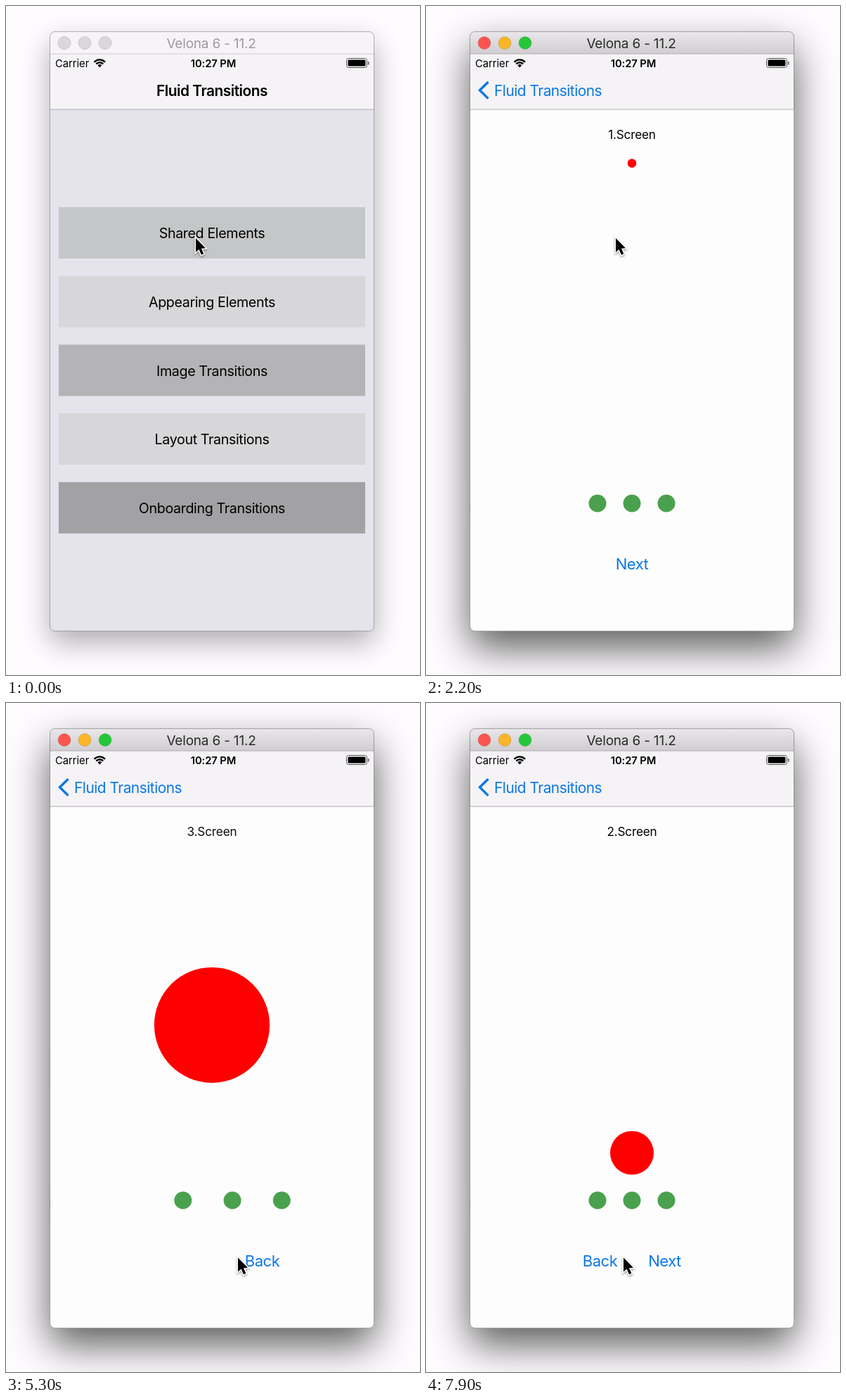
Animation, 589 px wide and 951 px high, one loop 8 s. Source, as an HTML page with a canvas:

```html
<!DOCTYPE html>
<html lang="en">
<head>
<meta charset="utf-8">
<title>Fluid Transitions</title>
<style>
html, body { margin: 0; width: 100%; height: 100%; overflow: hidden; background: #fefcfe; }
canvas { display: block; }
</style>
</head>
<body>
<canvas id="stage" width="589" height="951"></canvas>
<script>
const c = document.getElementById('stage').getContext('2d');
const LOOP = 8000, STEP = 100;
const LEFT = 62.5, TOP = 36.5, WIDTH = 461, BOTTOM = 888.5, MID = 293, NAV = 147;
const BLUE = '#0a78e6', PAPER = '#fefdfe', LAVENDER = '#e5e4ed';

const clamp = x => Math.max(0, Math.min(1, x));
const mix = (a, b, p) => a + (b - a) * p;
const smooth = x => { x = clamp(x); return x * x * (3 - 2 * x); };
const inOut4 = x => { x = clamp(x); return x < .5 ? 8 * x ** 4 : 1 - 8 * (1 - x) ** 4; };

function rect(x, y, w, h, fill) {
  c.fillStyle = fill;
  c.fillRect(x, y, w, h);
}

function disc(x, y, r, fill) {
  c.fillStyle = fill;
  c.beginPath();
  c.arc(x, y, r, 0, 7);
  c.fill();
}

// y is the middle of the capitals
function text(str, x, y, size, { color = '#000', weight = 400, spacing = 0, align = 'center' } = {}) {
  c.font = `${weight} ${size}px Inter, sans-serif`;
  c.letterSpacing = spacing + 'px';
  c.textAlign = align;
  c.fillStyle = color;
  c.fillText(str, x, y + size * .364);
}

function faded(alpha, draw) {
  c.save();
  c.globalAlpha *= clamp(alpha);
  draw();
  c.restore();
}

function frame() {
  c.beginPath();
  c.roundRect(LEFT, TOP, WIDTH, BOTTOM - TOP, 7);
}

function windowShadow(active) {
  c.save();
  c.shadowColor = active ? 'rgba(0,0,0,.64)' : 'rgba(0,0,0,.32)';
  c.shadowBlur = active ? 56 : 40;
  c.shadowOffsetY = active ? 24 : 16;
  c.fillStyle = '#f5f3f6';
  frame();
  c.fill();
  c.restore();
}

function titleBar(active) {
  const g = c.createLinearGradient(0, 37, 0, 68);
  g.addColorStop(0, active ? '#e9e7e9' : '#f6f4f6');
  g.addColorStop(1, active ? '#cfcdcf' : '#f6f4f6');
  rect(62, 36, 462, 32, g);
  rect(62, 67.5, 462, 1, active ? '#b1afb1' : '#cfcdcf');
  ['#fc5450', '#fdb528', '#25c738'].forEach((color, i) => {
    disc(83 + 29 * i, 52.5, 9, active ? color : '#d9d7d9');
    c.strokeStyle = active ? 'rgba(0,0,0,.14)' : '#c9c7c9';
    c.lineWidth = 1;
    c.stroke();
  });
  text('Velona 6 - 11.2', 292, 53, 19, { color: active ? '#2b2a2b' : '#9b999b', spacing: -.2 });
}

function statusBar() {
  text('Carrier', 70, 81.5, 14.75, { align: 'left' });
  text('10:27 PM', 295, 81.5, 14.75, { weight: 600, spacing: -.1 });
  c.strokeStyle = '#000';
  c.lineWidth = 2.4;
  for (const r of [6.8, 10.6]) {
    c.beginPath();
    c.arc(133.3, 87, r, -Math.PI * .76, -Math.PI * .24);
    c.stroke();
  }
  c.fillStyle = '#000';
  c.beginPath();
  c.moveTo(133.3, 87.5);
  c.arc(133.3, 87, 4, -Math.PI * .76, -Math.PI * .24);
  c.fill();
  c.lineWidth = 1;
  c.strokeStyle = '#555';
  c.beginPath();
  c.roundRect(484.5, 74.5, 29, 13, 3);
  c.stroke();
  c.fillStyle = '#000';
  c.beginPath();
  c.roundRect(486.5, 76.5, 25, 9, 1.5);
  c.fill();
  rect(515, 79, 1.5, 4.5, '#555');
}

function navBar(push) {
  faded(1 - push, () => text('Fluid Transitions', MID, 120.5, 20.9, { weight: 600, spacing: -.5 }));
  faded(push, () => {
    c.strokeStyle = BLUE;
    c.lineWidth = 3.4;
    c.beginPath();
    c.moveTo(88.5, 108);
    c.lineTo(76.5, 119.8);
    c.lineTo(88.5, 131.6);
    c.stroke();
    text('Fluid Transitions', 97, 120.5, 20.9, { color: BLUE, spacing: -.5, align: 'left' });
  });
  rect(62, 146.5, 462, 1, '#b0aeb2');
}

const rows = [
  ['Shared Elements', '#c5c6c7'], ['Appearing Elements', '#d7d6d8'], ['Image Transitions', '#b4b3b5'],
  ['Layout Transitions', '#d7d6d8'], ['Onboarding Transitions', '#a2a1a3']
];

// Opacity of a touched button: quick dip, slower return
function touch(ms) {
  if (ms < 0 || ms > 350) return 1;
  return ms < 100 ? mix(1, .2, ms / 100) : mix(.2, 1, smooth((ms - 100) / 250));
}

function menu(t, push) {
  c.save();
  c.translate(-.3 * WIDTH * push, 0);
  rows.forEach(([label, color], i) => {
    const y = 286 + 97.7 * i;
    faded(i ? 1 : touch(t - 330), () => {
      rect(75, y, 436, 73, color);
      text(label, MID, y + 37, 19.7, { spacing: -.39 });
    });
  });
  c.restore();
  if (push <= 0) return;
  rect(62, NAV, 462, 742, `rgba(0,0,0,${.18 * push})`);
  const edge = LEFT + WIDTH * (1 - push);
  const g = c.createLinearGradient(edge - 5, 0, edge, 0);
  g.addColorStop(0, 'rgba(0,0,0,0)');
  g.addColorStop(1, 'rgba(0,0,0,.18)');
  rect(edge - 5, NAV, 5, 742, g);
  rect(edge, NAV, 470, 742, LAVENDER);
}

const screens = [
  null,
  { y: 223.5, r: 6.3, buttons: [['Next', 293]] },
  { y: 639.5, r: 31, buttons: [['Back', 247.5], ['Next', 339.5]] },
  { y: 444, r: 86, buttons: [['Back', 293]] }
];
const moves = [
  { at: 1320, from: 0, to: 1 },
  { at: 2953, from: 1, to: 2, button: 'Next' },
  { at: 4780, from: 2, to: 3, button: 'Next' },
  { at: 6950, from: 3, to: 2, button: 'Back' }
];
const DURATION = 750, SPAN = .456, LAG = .021;

// Dots and buttons slide one after another; shift(k) is the offset of the k-th part
function parts(screen, shift, pressed, alpha) {
  for (let k = 0; k < 3; k++) disc(244 + 49 * k + shift(k), 707, 12.5, '#4aa14d');
  for (const [label, x] of screen.buttons) {
    faded(label === pressed ? alpha : 1, () =>
      text(label, x + shift(3), 792.5, 22.1, { color: BLUE, spacing: -.53 }));
  }
}

function onboarding(t) {
  const move = moves.filter(m => t >= m.at - 150).pop();
  if (!move) return;
  const p = inOut4((t - move.at) / DURATION);
  const a = screens[move.from], b = screens[move.to];
  const dir = move.to > move.from ? 1 : -1;

  faded(a ? 1 : p, () => {
    rect(62, NAV, 462, 742, PAPER);
    const from = a || b;
    disc(MID, mix(from.y, b.y, p), mix(from.r, b.r, p), '#fe0000');
  });
  const heading = (n, alpha) => faded(alpha, () => text(n + '.Screen', MID, 183, 17.2, { spacing: -.19 }));
  if (a) heading(move.from, 1 - p);
  heading(move.to, p);

  if (a && p < 1) {
    const leave = k => -dir * WIDTH * Math.max(0, (p - k * LAG) / SPAN);
    parts(a, leave, move.button, touch(t - move.at + 150));
  }
  if (p > 0) parts(b, k => dir * WIDTH * Math.max(0, (1 - (3 - k) * LAG - p) / SPAN));
}

const path = [
  [2250, 2680, 296.5, 782], [3800, 4350, 330, 788.5], [5700, 6250, 305, 787.5], [7400, 7800, 281, 788.5]
];

function cursor(t) {
  let x = 270, y = 330;
  for (const [start, end, nx, ny] of path) {
    const p = smooth((t - start) / (end - start));
    x = mix(x, nx, p);
    y = mix(y, ny, p);
  }
  c.save();
  c.translate(x, y);
  c.beginPath();
  c.moveTo(0, 0);
  for (const [px, py] of [[0, 20], [4.5, 16], [8, 23.8], [11.3, 22.3], [8, 14.8], [14, 14.3]]) c.lineTo(px, py);
  c.closePath();
  c.shadowColor = 'rgba(0,0,0,.4)';
  c.shadowBlur = 3;
  c.shadowOffsetY = 1.5;
  c.lineWidth = 3;
  c.strokeStyle = '#fff';
  c.stroke();
  c.shadowColor = 'transparent';
  c.fillStyle = '#000';
  c.fill();
  c.restore();
}

function draw(t) {
  const active = t >= 100;
  const push = 1 - (1 - clamp((t - 450) / 500)) ** 4.6;
  rect(0, 0, 589, 951, '#fefcfe');
  windowShadow(active);

  c.save();
  frame();
  c.clip();
  rect(62, NAV, 462, 742, LAVENDER);
  c.save();
  c.beginPath();
  c.rect(62, NAV, 462, 742);
  c.clip();
  menu(t, push);
  onboarding(t);
  c.restore();
  titleBar(active);
  statusBar();
  navBar(push);
  c.restore();

  c.strokeStyle = active ? 'rgba(0,0,0,.3)' : 'rgba(0,0,0,.28)';
  c.lineWidth = 1;
  frame();
  c.stroke();
  cursor(t);
}

function tick() {
  draw(Math.floor(performance.now() % LOOP / STEP) * STEP);
  requestAnimationFrame(tick);
}
tick();
</script>
</body>
</html>
```
